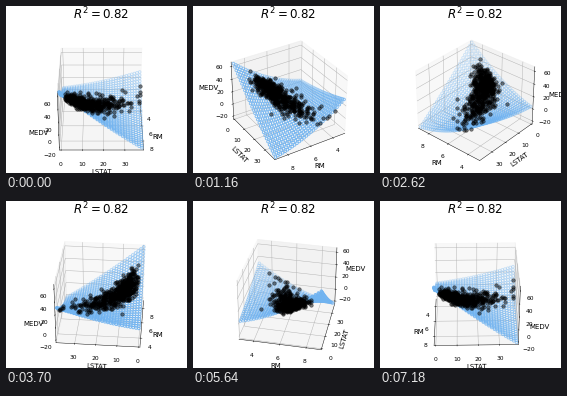
A matplotlib script that plays this animation: 181 by 167 pixels, repeating every 7200 ms.

```python
import matplotlib.pyplot as plt
import numpy as np
from matplotlib.animation import FuncAnimation

W, H, DPI = 181, 167, 40
FRAMES = 360
ELEV = 33
CX, CY, SIDE = 95.5, 92, 146.6     # middle of the cube and size of the axes, px

RM = (3, 9)
LSTAT = (0, 38)


def model(rm, lstat):
    """Regression surface: interaction term plus mild curvature."""
    u = (rm - RM[0]) / (RM[1] - RM[0])
    v = (lstat - LSTAT[0]) / (LSTAT[1] - LSTAT[0])
    plane = (4 + 61 * u) * (1 - v) + (30 - 52.5 * u) * v
    return plane - 32 * u * (1 - u) - 12 * v * (1 - v)


def housing(n=506, seed=4):
    rng = np.random.default_rng(seed)
    lstat = np.clip(1.7 + rng.gamma(2.2, 5, n), 1.7, 37.9)
    rm = np.clip(7.05 - 0.061 * lstat + rng.normal(0, 0.57, n), 3.6, 8.75)
    medv = np.clip(model(rm, lstat) + rng.normal(0, 3.9, n), 5, 50)
    return rm, lstat, medv


fig = plt.figure(figsize=(W / DPI, H / DPI), dpi=DPI, facecolor="white")
shift = 0.95 / 1.85 * SIDE
ax = fig.add_axes([(CX - shift) / W, (H - CY - shift) / H, SIDE / W, SIDE / H],
                  projection="3d")
ax.set_box_aspect((1, 1, 0.823), zoom=0.894)

ax.plot(*housing(), color="k", zorder=15, linestyle="none", marker="o",
        markersize=6.4, markeredgewidth=1.06, alpha=0.5)

xx, yy = np.meshgrid(np.linspace(*RM, 30), np.linspace(*LSTAT, 30))
ax.scatter(xx.ravel(), yy.ravel(), model(xx, yy).ravel(),
           facecolor=(0, 0, 0, 0), s=22, edgecolor="#70b3f0", linewidth=1.6)

ax.set_xlim(2.875, 9.125)
ax.set_ylim(-0.8, 38.8)
ax.set_zlim(-24.4, 67)
ax.set_xticks([4, 6, 8])
ax.set_yticks([0, 10, 20, 30])
ax.set_zticks([-20, 0, 20, 40, 60])
ax.tick_params(labelsize=10.8, pad=7)
ax.set_xlabel("RM", fontsize=12.6, labelpad=7)
ax.set_ylabel("LSTAT", fontsize=12.6, labelpad=7)
ax.set_zlabel("MEDV", fontsize=12.6, labelpad=9.3)

fig.text(95 / W, 1 - 13.3 / H, "$R^2 = 0.82$", fontsize=21.3,
         ha="center", va="baseline")


def rotate(i):
    # the tiny offset keeps the axes on a definite side at right angles
    ax.view_init(elev=ELEV, azim=i + 1e-3)
    return []


anim = FuncAnimation(fig, rotate, frames=FRAMES, init_func=lambda: rotate(0),
                     interval=20, repeat=True, repeat_delay=0, blit=False)
plt.show()
```
